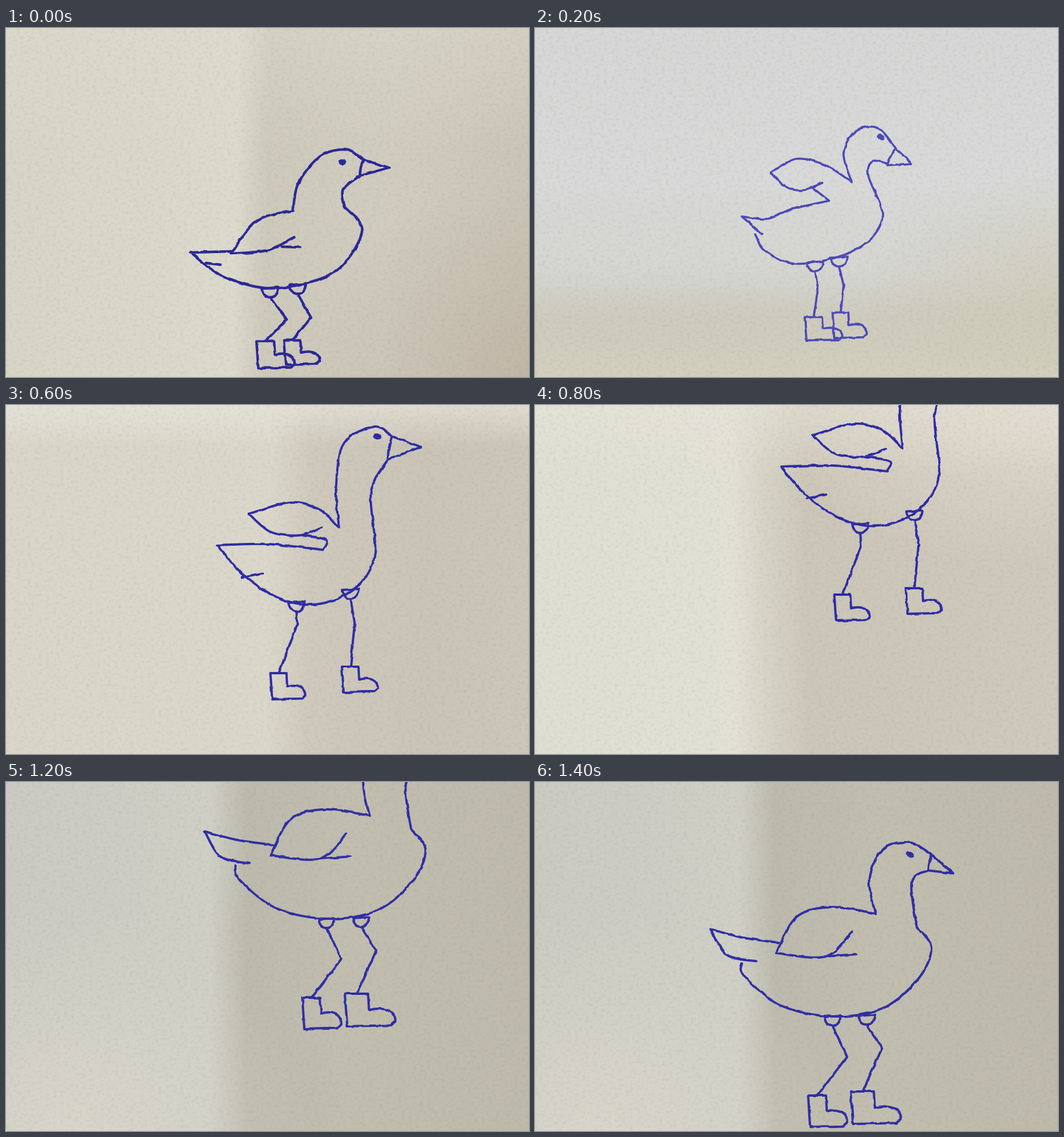
An HTML page for the animation above (1.6 s loop, 900 by 600 pixels).

```html
<!DOCTYPE html>
<html lang="en">
<head>
<meta charset="utf-8">
<title>Jumping bird in boots</title>
<style>
html, body { margin: 0; width: 100%; height: 100%; overflow: hidden; background: #d5d2c5; }
svg { position: absolute; left: 0; top: 0; width: 900px; height: 600px; overflow: hidden; }
.page {
  visibility: hidden;
  animation: flip 1600ms step-end infinite;
  animation-delay: calc(var(--i) * 200ms - 1600ms);
}
@keyframes flip {
  0% { visibility: visible; }
  12.5%, 100% { visibility: hidden; }
}
.page path { fill: none; stroke-linecap: round; stroke-linejoin: round; }

.crouch {
  background:
    radial-gradient(ellipse 420px 330px at 900px 600px, rgba(182,165,148,.45), transparent),
    linear-gradient(180deg, rgba(222,220,206,.45), transparent 35%),
    linear-gradient(91deg, #d6d5c6 0, #dbdacd 44%, #cdc9bb 50%, #d0ccbf 72%, #cac4b6 100%);
}
.spread {
  background:
    radial-gradient(ellipse 330px 190px at 900px 440px, rgba(206,202,180,.6), transparent),
    linear-gradient(180deg, #d6d7d6 0, #d8d9d8 45%, #d5d5d1 70%, #cdcbbd 83%, #d2cfbe 100%);
}
.lift {
  background:
    linear-gradient(180deg, #e9dcb8 0, rgba(227,217,196,.75) 10%, rgba(220,216,207,.4) 28%, transparent 48%),
    linear-gradient(90deg, #dbe1e5 0, #dde1e5 62%, #d2d4d8 67%, #cbccd0 72%, #d2d2d6 100%);
}
.stretch {
  background:
    linear-gradient(180deg, rgba(232,229,220,.7) 0, transparent 12%),
    linear-gradient(91deg, #d9d6c9 0, #dbd8cb 50%, #cec9bc 58%, #c9c4b6 80%, #cbc6b8 100%);
}
.rise, .top {
  background:
    radial-gradient(ellipse 480px 270px at 850px 0, rgba(228,221,211,.8), transparent),
    linear-gradient(180deg, rgba(231,228,218,.6) 0, transparent 20%),
    linear-gradient(89deg, #dedfd2 0, #e2e1d6 38%, #d7d4c7 44%, #cbc6b8 52%, #cec9bc 100%);
}
.fall, .land {
  background:
    radial-gradient(ellipse 430px 380px at 100px 600px, rgba(221,218,206,.7), transparent),
    linear-gradient(90deg, #cacac2 0, #cfcfc6 39%, #bcbaad 46%, #c1beb0 65%, #bebaab 100%);
}
</style>
</head>
<body>
<script>
// Strokes run smoothly through key points; "|" marks a sharp corner.
// beak: top, tip, bottom. legs: hip x y, knee x y, boot x y w h.
const poses = {
  crouch: {
    ink: '#2a2798', width: 4.4, eye: '579,230',
    head: '494,314 503,267 540,221 584,209 615,226',
    beak: '615,226 659,240 609,254',
    belly: '609,254 580,278 583,308|613,348 575,412 515,439 445,447 370,425 317,386|388,384',
    wing: '495,314 432,331 387,388|450,382 496,360',
    tufts: ['475,376 506,377', '345,404 369,407'],
    legs: [[455, 448, 483, 501, 431, 538, 66, 47], [502, 442, 525, 498, 478, 537, 62, 42]]
  },
  spread: {
    ink: '#4d49b8', width: 3.7, eye: '595,188',
    head: '545,265 531,215 552,177 590,172 621,207',
    beak: '621,207 648,233 606,236',
    belly: '606,233 580,229 574,255 598,320 575,365 520,394 445,405 395,382 379,355',
    wing: '545,265 500,236 450,225 406,248|430,272 460,279 495,266',
    tufts: ['390,354 356,324|400,328 440,312 506,297|477,274'],
    legs: [[482, 403, 487, 448, 464, 497, 65, 40], [523, 395, 531, 442, 512, 489, 59, 44]]
  },
  lift: {
    ink: '#3733b0', width: 3.9, eye: '610,118',
    head: '533,216 548,175 560,122 598,101 634,121',
    beak: '634,121 669,143 628,149',
    belly: '628,149 605,175 607,260 580,313 510,344 435,343 412,317',
    wing: '533,216 495,144 465,131 418,130|435,192 482,203',
    tufts: ['425,317 385,304 368,269|496,261|470,228 468,204'],
    legs: [[484, 346, 504, 418, 474, 478, 59, 43], [536, 335, 555, 402, 539, 456, 64, 44]]
  },
  stretch: {
    ink: '#2e2ba5', width: 3.9, eye: '639,54',
    head: '573,210 568,140 582,65 635,37 664,54',
    beak: '664,54 714,72 657,94',
    belly: '657,94 628,150 635,255 605,311 545,341 480,336 412,295 363,241|450,239 546,249|551,232 510,224',
    wing: '572,210 540,180 490,167 418,187|455,218 505,224 543,210',
    tufts: ['407,296 441,289'],
    legs: [[500, 340, 501, 378, 455, 461, 60, 45], [593, 318, 600, 375, 578, 450, 62, 44]]
  },
  top: {
    ink: '#2e2c9e', width: 4.1,
    belly: '519,0 565,44 640,66 715,42 744,0',
    legs: [[602, 66, 610, 120, 557, 194, 68, 42], [705, 53, 714, 112, 683, 178, 65, 56]]
  },
  land: {
    ink: '#302da5', width: 4, eye: '645,124',
    head: '586,227 575,165 600,115 645,104 683,125',
    beak: '683,125 719,157 676,152',
    belly: '676,152 648,172 657,249|682,285 660,338 600,388 515,403 425,385 360,334 356,312',
    wing: '586,226 510,215 450,232 415,294|500,300 546,257',
    tufts: ['500,300 553,296', '420,276 360,268 302,253|330,297 380,308'],
    legs: [[512, 404, 537, 472, 470, 539, 67, 54], [571, 402, 597, 458, 543, 532, 87, 56]]
  }
};

// page style, pose, shift x, shift y
const pages = [
  ['crouch', 'crouch'], ['spread', 'spread'], ['lift', 'lift'], ['stretch', 'stretch'],
  ['rise', 'stretch', 60, -135], ['top', 'top'], ['fall', 'land', 40, -168], ['land', 'land']
];

const parse = run => run.split(' ').map(s => s.split(',').map(Number));

function smooth(p) {
  let d = '';
  for (let i = 0; i < p.length - 1; i++) {
    const a = p[i - 1] || p[i], b = p[i], c = p[i + 1], e = p[i + 2] || c;
    const c1 = b.map((v, k) => v + (c[k] - a[k]) / 6);
    const c2 = c.map((v, k) => v - (e[k] - b[k]) / 6);
    d += `C${c1} ${c2} ${c}`;
  }
  return d;
}

function trace(stroke) {
  let last, d = '';
  for (const run of stroke.split('|')) {
    const pts = parse(run);
    if (last) pts.unshift(last);
    else d = 'M' + pts[0];
    d += smooth(pts);
    last = pts[pts.length - 1];
  }
  return d;
}

function beak(points) {
  const [top, tip, low] = parse(points);
  const mid = [(top[0] + low[0]) / 2 - 3, (top[1] + low[1]) / 2];
  return `M${top}L${tip}L${low}Q${mid} ${top}`;
}

function leg([hx, hy, kx, ky, x, y, w, h]) {
  const at = (u, v) => `${x + u * w},${y + v * h}`;
  const hip = `M${hx - 14},${hy}q2,15 14,15t14,-17z`;
  const shin = `M${hx},${hy + 15}L${kx},${ky}L${at(.24, 0)}`;
  const boot = `M${at(0, 0)}L${at(.46, 0)}L${at(.48, .5)}C${at(.75, .4)} ${at(1, .5)} ${at(1, .85)}L${at(.9, .97)}L${at(.05, 1)}Z`;
  return hip + shin + boot;
}

function page([look, name, dx = 0, dy = 0], i) {
  const p = poses[name];
  const strokes = [p.head, p.belly, p.wing, ...(p.tufts || [])].filter(Boolean);
  let d = strokes.map(trace).join('') + p.legs.map(leg).join('');
  let eye = '';
  if (p.beak) {
    d += beak(p.beak);
    eye = `<ellipse rx="7" ry="5" fill="${p.ink}" transform="translate(${p.eye}) rotate(20)"/>`;
  }
  return `<svg class="page ${look}" style="--i:${i}" viewBox="0 0 900 600">
    <g filter="url(#wobble)"><g transform="translate(${dx} ${dy})">
    <path stroke="${p.ink}" stroke-width="${p.width}" d="${d}"/>${eye}</g></g></svg>`;
}

// A slightly shaky pen and faint paper grain, both from seeded noise.
const area = 'filterUnits="userSpaceOnUse" x="0" y="0" width="900" height="600" color-interpolation-filters="sRGB"';
const paper = `<svg viewBox="0 0 900 600">
  <filter id="wobble" ${area}>
    <feTurbulence type="fractalNoise" baseFrequency=".07" numOctaves="2" seed="2"/>
    <feDisplacementMap in="SourceGraphic" scale="4" xChannelSelector="R" yChannelSelector="G"/>
  </filter>
  <filter id="grain" ${area}>
    <feTurbulence type="fractalNoise" baseFrequency=".16 .2" numOctaves="3" seed="4"/>
    <feColorMatrix values="0 0 0 0 .45  0 0 0 0 .43  0 0 0 0 .36  .24 0 0 0 -.11"/>
  </filter>
  <rect width="900" height="600" filter="url(#grain)"/></svg>`;

document.body.innerHTML = pages.map(page).join('') + paper;
</script>
</body>
</html>
```
